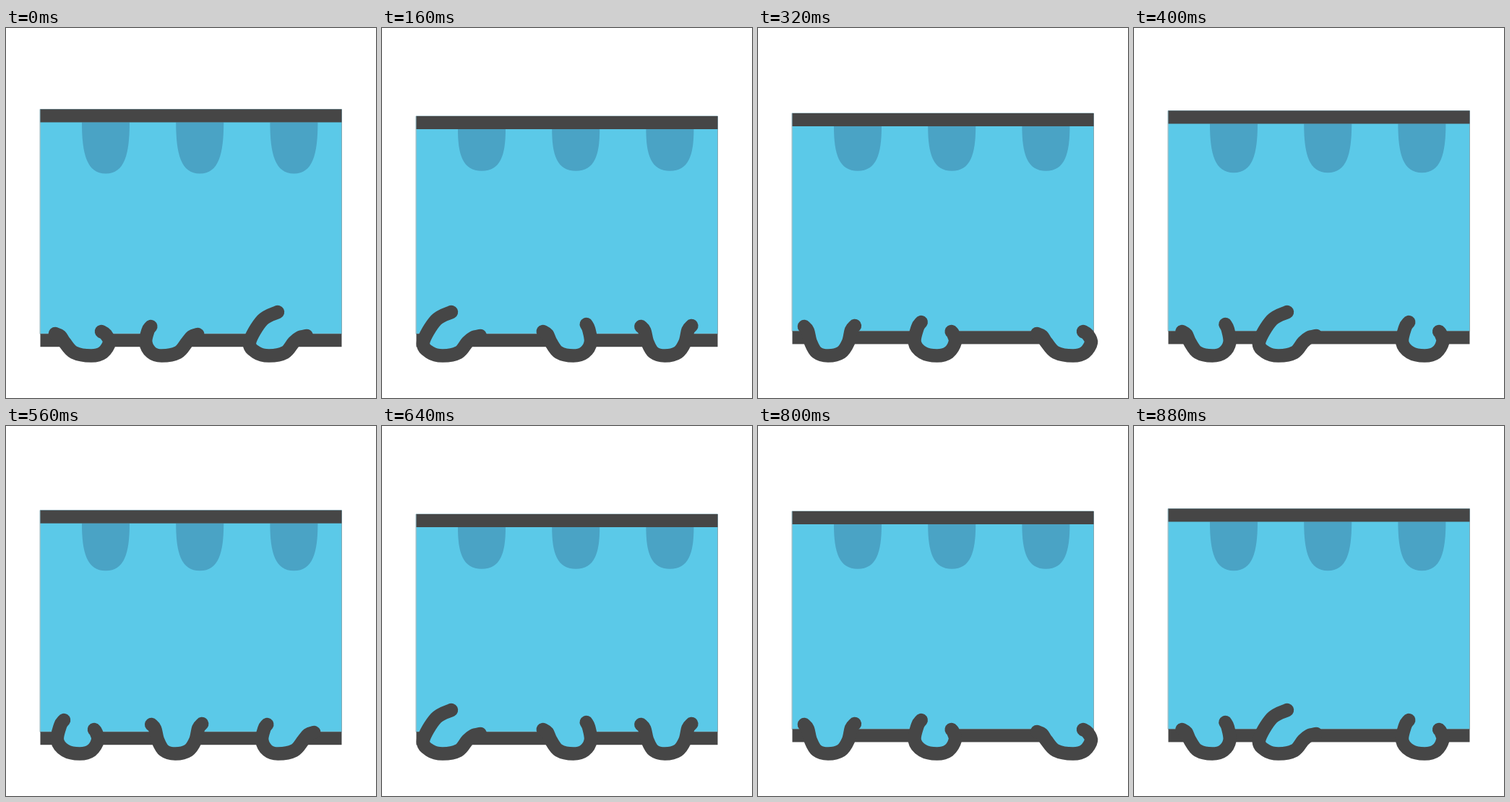
Write an HTML page with a canvas that moves like this. It is 512 px wide and 512 px high and loops after 960 ms.

```html
<!DOCTYPE html>
<html lang="en">
<head>
<meta charset="utf-8">
<title>Walking body</title>
<style>
  html, body { margin: 0; width: 100%; height: 100%; overflow: hidden; background: #fff; }
  canvas { display: block; width: 512px; height: 512px; }
</style>
</head>
<body>
<canvas id="stage" width="512" height="512"></canvas>
<script>
const ctx = document.getElementById('stage').getContext('2d');
const STEP = 80, POSES = 6;
const SKY = '#5bc9e8', SPOT = '#4aa3c5', INK = '#464646', EDGE = '#7fa9b5';
const LEFT = 47.5, WIDTH = 417, BAR = 18;
const SIDE_Y = 435, FOOT_Y = 453.5;

// One gait cycle shared by all legs: foot travel, then the tips
// and side bulges of the loop measured from the foot.
const gait = [
  { travel: 0,    start: [12, 393],  left: -27, right: 34, end: [52, 426] },
  { travel: 0.17, start: [-15, 413], left: -22, right: 35, end: [50, 424] },
  { travel: 0.38, start: [-33, 413], left: -24, right: 28, end: [37, 412] },
  { travel: 0.72, start: [-42, 420], left: -31, right: 24, end: [18, 410] },
  { travel: 1,    start: [-50, 423], left: -37, right: 25, end: [14, 420] },
  { travel: 0.53, start: [-22, 407], left: -31, right: 25, end: [20, 420] }
];
const legs = [
  { x: 84, reach: 34, lead: 4 },
  { x: 200, reach: 90, lead: 1 },
  { x: 364, reach: 72, lead: 0 }
];
const topEdge = [112.5, 116.7, 122, 114.5, 118, 114.5];

const mix = (a, b, t) => a + (b - a) * t;

// Points on one side of a leg, from its tip down towards the foot.
const sidePoints = ([tipX, tipY], side) => [
  [tipX, tipY],
  [mix(side, tipX, 0.45), mix(tipY, SIDE_Y, 0.27)],
  [side, SIDE_Y],
  [side * 0.65, FOOT_Y - 4.5]
];

function legPoints({ x, reach, lead }, step) {
  const { travel, start, left, right, end } = gait[(step + lead) % POSES];
  const foot = x + reach * travel;
  return [...sidePoints(start, left), [0, FOOT_Y], ...sidePoints(end, right).reverse()]
    .map(([dx, y]) => [foot + dx, y]);
}

// Smooth curve through all points.
function trace(points) {
  const last = points.length - 1;
  const at = i => points[Math.max(0, Math.min(last, i))];
  const handle = (i, sign) =>
    at(i).map((v, axis) => v + sign * (at(i + 1)[axis] - at(i - 1)[axis]) / 6);
  ctx.beginPath();
  ctx.moveTo(...points[0]);
  for (let i = 0; i < last; i++) {
    ctx.bezierCurveTo(...handle(i, 1), ...handle(i + 1, -1), ...points[i + 1]);
  }
}

function drawLeg(points) {
  // Open the lower bar above the leg before inking its outline.
  trace(points);
  ctx.lineTo(points.at(-1)[0], 404);
  ctx.lineTo(points[0][0], 404);
  ctx.fillStyle = SKY;
  ctx.fill();
  trace(points);
  ctx.strokeStyle = INK;
  ctx.lineWidth = 18.5;
  ctx.lineCap = ctx.lineJoin = 'round';
  ctx.stroke();
}

function drawSpot(x, top, bottom) {
  const shoulder = mix(top, bottom, 0.62);
  ctx.beginPath();
  ctx.moveTo(x - 33, top);
  ctx.bezierCurveTo(x - 33, shoulder, x - 26, bottom, x, bottom);
  ctx.bezierCurveTo(x + 26, bottom, x + 33, shoulder, x + 33, top);
  ctx.fill();
}

function draw(step) {
  const top = topEdge[step];
  const barTop = step < POSES / 2 ? 423.2 : 419.4;
  const spotBottom = 199 + 2.5 * Math.cos(step / POSES * 2 * Math.PI);

  ctx.fillStyle = '#fff';
  ctx.fillRect(0, 0, 512, 512);
  ctx.fillStyle = SKY;
  ctx.fillRect(LEFT, top, WIDTH, barTop - top);
  ctx.strokeStyle = EDGE;
  ctx.lineWidth = 1;
  ctx.strokeRect(LEFT, top, WIDTH, barTop - top);

  ctx.fillStyle = SPOT;
  for (let i = 0; i < 3; i++) drawSpot(138 + i * 130.2, top + BAR, spotBottom);

  ctx.fillStyle = INK;
  ctx.fillRect(LEFT, top, WIDTH, BAR);
  ctx.fillRect(LEFT, barTop, WIDTH, BAR);
  for (const leg of legs) drawLeg(legPoints(leg, step));
}

let start;
function tick(now) {
  start ??= now;
  draw(Math.floor(Math.max(0, now - start) / STEP) % POSES);
  requestAnimationFrame(tick);
}
draw(0);
requestAnimationFrame(tick);
</script>
</body>
</html>
```
